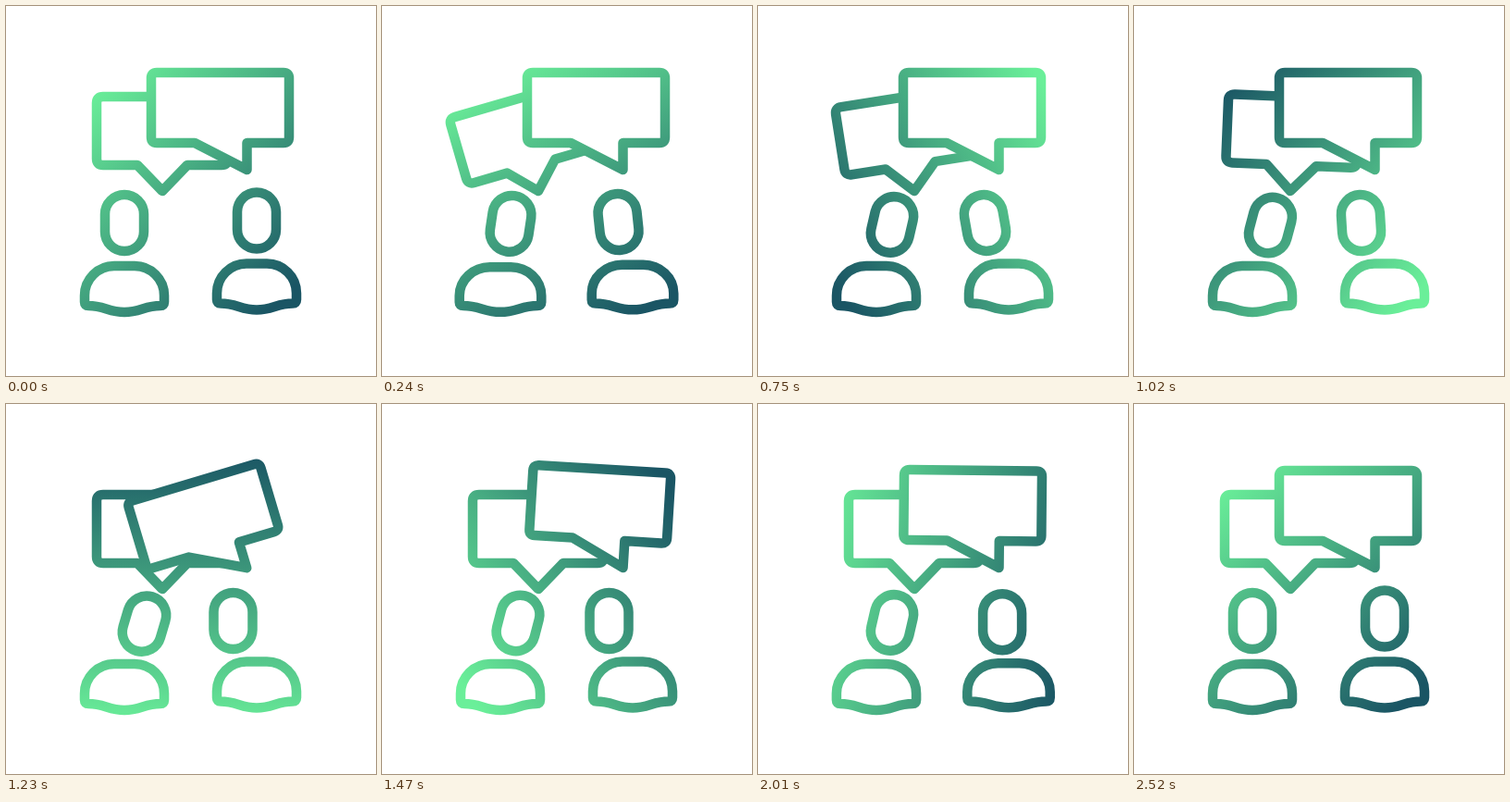
These frames come from a looping animation (400 px wide and 400 px high, 4550 ms). An HTML page with a canvas:

```html
<!DOCTYPE html>
<html lang="en">
<head>
<meta charset="utf-8">
<title>Conversation</title>
<style>
  html, body { margin: 0; width: 100%; height: 100%; overflow: hidden; background: #fff; }
  canvas { display: block; }
</style>
</head>
<body>
<canvas width="400" height="400"></canvas>
<script>
const ctx = document.querySelector('canvas').getContext('2d');
const LOOP = 4550, ACTIVE = 2520, STEP = 30;

const backBubble = new Path2D('M105 98H233Q240 98 240 105V165Q240 172 233 172H196L169 200L142 172H105Q98 172 98 165V105Q98 98 105 98Z');
const frontBubble = new Path2D('M163 72H300Q306 72 306 78V142Q306 148 300 148H260.5V177L204 148H163Q157 148 157 142V78Q157 72 163 72Z');
const head = new Path2D('M107 225A21 21 0 0 1 149 225V244A21 21 0 0 1 107 244Z');
const body = new Path2D('M85 313A32 32 0 0 1 117 281H139A32 32 0 0 1 171 313V320Q171 324 167 324C150 324 145 331 128 331S106 324 89 324Q85 324 85 320Z');

// Smooth step from 0 at t0 to 1 at t1.
function ease(t, t0, t1) {
  const u = Math.max(0, Math.min(1, (t - t0) / (t1 - t0)));
  return u * u * (3 - 2 * u);
}

// Rises to 1 at mid and falls back.
const bump = (t, mid, half) => ease(t, mid - half, mid) - ease(t, mid, mid + half);

// Rises to 1 between a and b, falls back between c and d.
const hold = (t, a, b, c, d) => ease(t, a, b) - ease(t, c, d);

// Fading pendulum: each swing is shorter and 6 degrees smaller than the last.
const peakTime = n => n < 0 ? 0 : 170 + n * (325 - 20 * n);
const peakAngle = n => n < 0 || n > 3 ? 0 : (6 * n - 21) * (-1) ** n;

function swing(t) {
  let angle = 0;
  for (let n = 0; n < 5; n++) {
    angle += (peakAngle(n) - peakAngle(n - 1)) * ease(t, peakTime(n - 1), peakTime(n));
  }
  return angle;
}

// The gradient makes one full turn, fastest in the first half.
function gradient(t) {
  const angle = (225 + 144 * t / ACTIVE + 216 * ease(t, 200, 1760)) * Math.PI / 180;
  const x = 152 * Math.cos(angle), y = 152 * Math.sin(angle);
  const g = ctx.createLinearGradient(200 + x, 200 + y, 200 - x, 200 - y);
  g.addColorStop(0, '#6aef99');
  g.addColorStop(1, '#1a5564');
  return g;
}

function draw(shape, matrix) {
  const path = new Path2D();
  path.addPath(shape, matrix);
  ctx.fill(path);
  ctx.stroke(path);
}

const move = (x, y) => new DOMMatrix().translate(x, y);
const turn = (x, y, angle) => move(x, y).rotate(angle).translate(-x, -y);
const squash = (dx, dy, s) => move(128 + dx, 325 + dy).scale(1 + s, 1 - s).translate(-128, -325);

function render(t) {
  ctx.fillStyle = '#fff';
  ctx.fillRect(0, 0, 400, 400);
  ctx.strokeStyle = gradient(t);
  ctx.lineWidth = 10.5;
  ctx.lineJoin = 'round';

  draw(backBubble, turn(169, 200, swing(t)));
  draw(frontBubble, turn(261, 178, swing(t - 1110)));

  const firstPulse = bump(t, 180, 180);
  draw(body, squash(0, 0, 0.04 * (firstPulse + bump(t, 2180, 200))));
  const leftTilt = 13 * hold(t, 0, 400, 2080, 2460) + 3.5 * bump(t, 1230, 450);
  draw(head, turn(128, 310, leftTilt));

  const dip = bump(t, 2010, 250);
  draw(body, squash(143, -2.5, 0.04 * (firstPulse + dip)));
  const away = hold(t, 0, 420, 1740, 2150);
  const rightTilt = -10 * hold(t, 0, 420, 750, 1200);
  draw(head, move(271 - 25.5 * away, 232 + 2.5 * away + 3 * dip).rotate(rightTilt).translate(-128, -234.5));
}

const start = performance.now();
function tick() {
  const t = (performance.now() - start) % LOOP;
  render(Math.min(ACTIVE, Math.floor(t / STEP) * STEP));
  requestAnimationFrame(tick);
}
tick();
</script>
</body>
</html>
```
